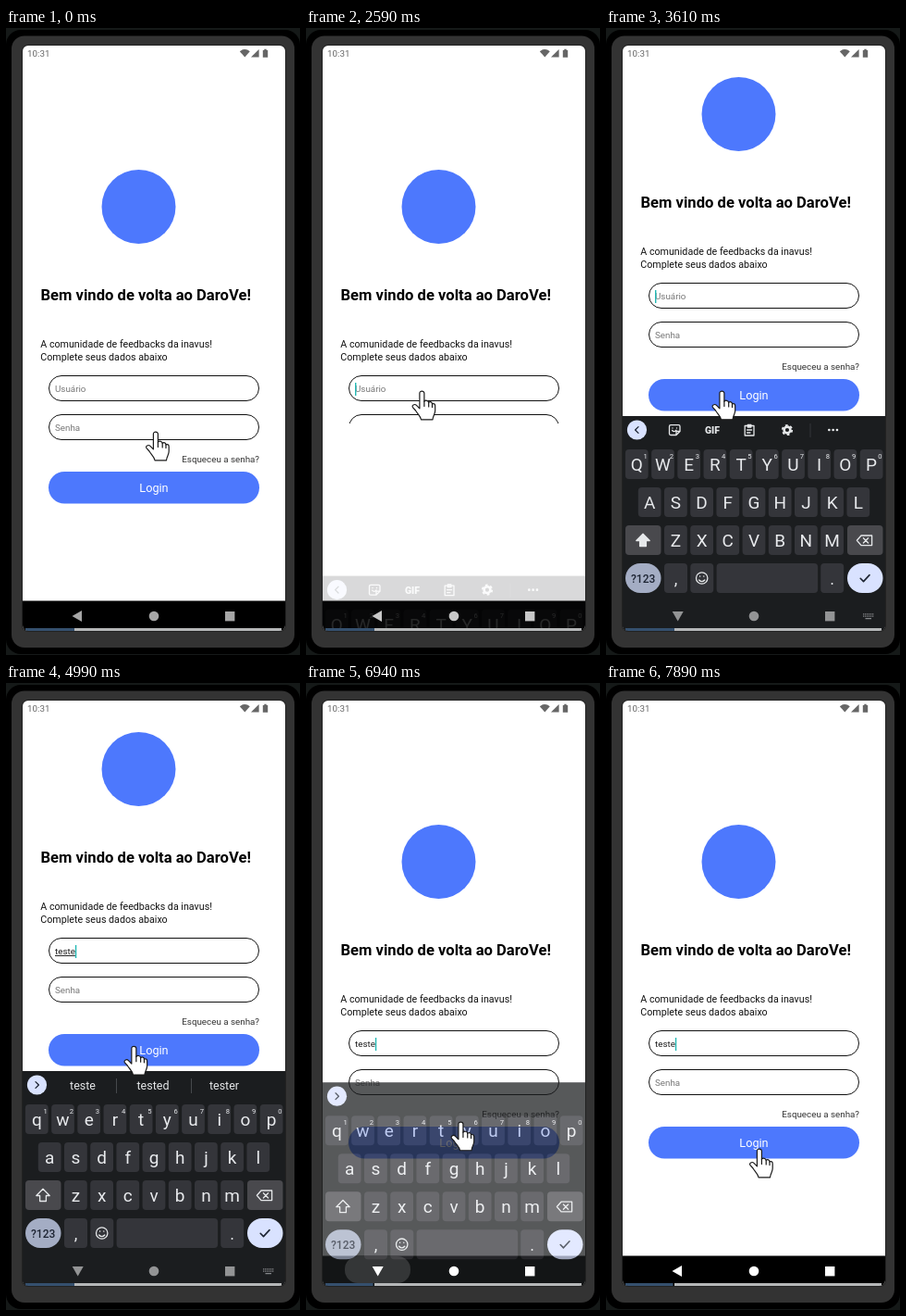
An HTML page for the animation above (8000 ms loop, 318 by 677 pixels).

```html
<!DOCTYPE html>
<html lang="pt">
<head>
<meta charset="utf-8">
<title>Login</title>
<style>
html, body { margin: 0; width: 100%; height: 100%; overflow: hidden; background: #151918; }
svg { display: block; width: 318px; height: 677px; font-family: Roboto, "Open Sans", sans-serif; }
text { white-space: pre; }
.mid { text-anchor: middle; }
.line { fill: none; stroke: #e6e8ea; stroke-width: 1.3; stroke-linecap: round; stroke-linejoin: round; }
.ink { stroke: #1d2433; }
</style>
</head>
<body>
<svg viewBox="0 0 318 677">
  <defs>
    <clipPath id="screen"><rect x="18" y="19" width="284" height="632" rx="6"/></clipPath>
  </defs>
  <rect y="2" width="318" height="674" rx="16"/>
  <rect x="6" y="8.5" width="306" height="660.5" rx="14" fill="#333"/>
  <rect x="17" y="18" width="286" height="634" rx="7" fill="#222"/>
  <g clip-path="url(#screen)">
    <rect x="17" y="18" width="286" height="634" fill="#fff"/>

    <g id="page">
      <circle cx="143.5" cy="193" r="40" fill="#4d78fd"/>
      <text x="37.5" y="294" font-size="16.6" font-weight="700">Bem vindo de volta ao DaroVe!</text>
      <g font-size="10.7" fill="#111">
        <text x="37.3" y="345">A comunidade de feedbacks da inavus!</text>
        <text x="37.3" y="359">Complete seus dados abaixo</text>
      </g>
      <g fill="none" stroke="#111">
        <rect x="46.5" y="375.5" width="227" height="27" rx="13.5"/>
        <rect x="46.5" y="417.5" width="227" height="27" rx="13.5"/>
      </g>
      <g font-size="9.8">
        <text id="user" x="53" y="393"></text>
        <text x="53" y="435" fill="#777">Senha</text>
        <text x="274" y="469" text-anchor="end" fill="#333">Esqueceu a senha?</text>
      </g>
      <rect id="caret" y="383" width="1.4" height="14" fill="#22b8b4"/>
      <rect x="46" y="479" width="228" height="34.5" rx="17.2" fill="#4d78fd"/>
      <text class="mid" x="160" y="501" font-size="12.7" fill="#fff">Login</text>
      <rect id="blank" x="17" y="427" width="286" height="192" fill="#fff"/>
    </g>

    <g fill="#666">
      <text x="23" y="31.3" font-size="9.8">10:31</text>
      <path d="M252.8 25.2Q258.3 20.8 263.8 25.2L258.3 31.6Z"/>
      <path d="M265 31.6L273.6 23V31.6Z"/>
      <path d="M277.8 24H279.3V22.8H281.7V24H283.2V31.8H277.8Z"/>
    </g>

    <rect x="17" y="618.5" width="286" height="34"/>

    <g id="keyboard">
      <rect x="17" y="419" width="286" height="234" fill="#1b1d1f"/>
      <circle cx="33.5" cy="434" r="10.6" fill="#d9e2ff"/>
      <path id="chevron" class="line ink" d="M35 430.6L31.6 434L35 437.4"/>
      <g id="tools">
        <path class="line" d="M70 428.7H78.5Q80 428.7 80 430.2V435.5L76 439.5H70Q68.5 439.5 68.5 438V430.2Q68.5 428.7 70 428.7ZM80 435.5H76V439.5M71.6 434.5Q73.8 437 76 434.2M72 431.8V432M76.5 431.8V432"/>
        <text class="mid" x="115" y="438" font-size="10.5" font-weight="900" fill="#e6e8ea">GIF</text>
        <path class="line" d="M150.2 429.5H160V440H150.2ZM153.3 428.3H156.9V431H153.3ZM152.6 434H157.6M152.6 437H156"/>
        <g fill="none" stroke="#e6e8ea">
          <circle cx="196" cy="434" r="3.4" stroke-width="2.6"/>
          <circle cx="196" cy="434" r="5.2" stroke-width="1.8" stroke-dasharray="2.7 2.745"/>
        </g>
        <path d="M221 427V442" stroke="#34373a"/>
        <path class="line" style="stroke-width:2.6" d="M241.3 434H241.4M245.6 434H245.7M249.9 434H250"/>
      </g>
      <g id="words" class="mid" font-size="12.5" fill="#e6e8ea">
        <path d="M119.5 427V443M200.5 427V443" stroke="#46494c"/>
        <text x="83" y="439"></text><text x="159" y="439"></text><text x="236" y="439"></text>
      </g>
      <g id="keys" class="mid" fill="#e8eaed"></g>
      <path id="shift" class="line" d="M40 546.3L47.2 553.5H43.4V559.5H36.6V553.5H32.8Z"/>
      <path class="line" d="M276 548H287.6V558.6H276L271.4 553.3ZM278.4 550.8L283.6 556M283.6 550.8L278.4 556"/>
      <g class="line">
        <circle cx="103.7" cy="594" r="6.2"/>
        <path d="M100.6 596Q103.7 599.4 106.8 596M101.6 592V592.2M105.8 592V592.2"/>
      </g>
      <path class="line ink" style="stroke-width:1.6" d="M275.2 594.3L278.5 597.6L285 590.6"/>
    </g>

    <rect id="ripple" x="42" y="619" width="71" height="29" rx="14" fill="#fff"/>
    <g id="nav">
      <path id="back" d="M71.5 635L82 629V641Z"/>
      <circle cx="160" cy="635" r="5.3"/>
      <rect x="237" y="630" width="10.4" height="10.4"/>
      <g id="imeIcon" fill="none" stroke="#85878a" stroke-width="1.2">
        <path d="M278 632.8H289.5M278 635.2H289.5" stroke-dasharray="1.3 .7"/>
        <path d="M280.5 637.6H287"/>
      </g>
    </g>

    <rect x="74" y="648" width="224" height="3" fill="#b5b7b8"/>
    <rect id="played" x="21" y="648" height="3" fill="#35506e"/>
  </g>

  <g id="hand" stroke="#1a1a1a" stroke-width="1.2" stroke-linejoin="round" stroke-linecap="round">
    <path fill="#fff" d="M-2.6 2.2C-2.6-.6 2.4-.6 2.4 2.2V11.2C3.6 9.6 7 10 7.2 12.4C8.6 11.2 11 11.6 11 13.9C12.6 13 14.2 14 14.2 16V21C14.2 25 12 26 11.5 30.8H-1C-1.4 27-5 24.5-7 21L-10 17.6C-11.6 15.4-8 13.4-6 15.4L-2.6 18.8Z"/>
    <path fill="none" d="M2.4 11.2V16.5M7.2 12.6V17M11 14V17.6"/>
  </g>
</svg>
<script>
const LOOP = 8000;
const SVG = "http://www.w3.org/2000/svg";
const $ = id => document.getElementById(id);

function add(parent, tag, attrs, text = "") {
  const el = document.createElementNS(SVG, tag);
  for (const name in attrs) el.setAttribute(name, attrs[name]);
  el.textContent = text;
  return parent.appendChild(el);
}

// Keyboard layout
const letters = [];
function key(x, y, w, fill = "#34353a", r = 4) {
  add($("keys"), "rect", { x, y, width: w, height: 32, rx: r, fill });
}
function row(chars, firstX, y, digits) {
  [...chars].forEach((char, i) => {
    const x = firstX + i * 28.2;
    key(x - 12.4, y, 24.8);
    letters.push([add($("keys"), "text", { x, y: y + 23, "font-size": 19 }), char]);
    if (digits) add($("keys"), "text", { x: x + 9.3, y: y + 9.5, "font-size": 7.6 }, (i + 1) % 10);
  });
}
row("qwertyuiop", 33.3, 455, true);
row("asdfghjkl", 47.2, 496);
row("zxcvbnm", 75.4, 537);
key(21, 537, 38.5, "#49494d");
key(261, 537, 38.5, "#49494d");
key(21, 578, 38.5, "#a4adc4", 16);
key(63, 578, 25);
key(91.3, 578, 25);
key(119.6, 578, 109.5);
key(232.2, 578, 25);
key(261, 578, 38.5, "#d9e2ff", 16);
add($("keys"), "text", { x: 40.2, y: 598.5, "font-size": 12, "font-weight": 500, fill: "#1d2433" }, "?123");
add($("keys"), "text", { x: 75.5, y: 601, "font-size": 18 }, ",");
add($("keys"), "text", { x: 244.7, y: 601, "font-size": 18 }, ".");

// Timed tracks: [time, ...values], linear between points
const handPath = [
  [100, 162, 436], [380, 140, 409], [660, 125.5, 392], [4430, 125.5, 392], [4810, 138.5, 392],
  [4990, 138.5, 392], [5200, 128, 440], [5500, 100, 560], [5770, 78, 628], [5850, 75, 634],
  [6740, 75, 634], [6860, 130, 540], [6940, 167.5, 474], [7060, 171, 466], [7420, 166, 503]
];
const slide = [
  [2550, 232, 0], [2590, 174, .16], [2670, 64, .6], [2750, 15, 1], [2850, 0, 1],
  [6880, 0, 1], [6940, 11.3, .74], [7020, 85, .25], [7100, 190, 0]
];
const rippleFade = [[6700, 0], [6780, .2], [6900, .18], [7100, 0]];

const typed = [
  [3690, "t", "the", "to"],
  [3950, "te", "tell", "test"],
  [4190, "tes", "test", "yes"],
  [4510, "test", "tests", "testing"],
  [4810, "teste", "tested", "tester"]
];
const FOCUS = 2450, PAN_IN = 2650, DISMISS = 6860;

function at(track, t) {
  const next = track.findIndex(p => p[0] > t);
  if (next === 0) return track[0].slice(1);
  if (next < 0) return track[track.length - 1].slice(1);
  const a = track[next - 1], b = track[next], k = (t - a[0]) / (b[0] - a[0]);
  return a.slice(1).map((v, i) => v + (b[i + 1] - v) * k);
}

const show = (id, on) => { $(id).style.display = on ? "" : "none"; };
const during = (t, from, to) => t >= from && t < to;

function render(t) {
  const step = typed.filter(s => s[0] <= t).pop();
  const open = during(t, PAN_IN, DISMISS);
  const [offset, alpha] = at(slide, t);

  $("page").setAttribute("transform", `translate(0 ${open ? -100 : 0})`);
  show("blank", during(t, 2550, PAN_IN));

  const user = $("user");
  user.textContent = step ? step[1] : "Usuário";
  user.setAttribute("fill", step ? "#222" : "#777");
  user.setAttribute("text-decoration", step && t < DISMISS ? "underline" : "none");
  $("caret").setAttribute("x", step ? 53 + user.getComputedTextLength() : 53);
  const blinkStart = step ? step[0] + 20 : FOCUS;
  show("caret", t >= FOCUS && (t < blinkStart || Math.floor((t - blinkStart) / 500) % 2 === 0));

  $("keyboard").setAttribute("transform", `translate(0 ${offset})`);
  $("keyboard").setAttribute("opacity", alpha);
  show("tools", !step);
  show("words", step && t < DISMISS);
  if (step) $("words").querySelectorAll("text").forEach((el, i) => { el.textContent = step[i + 1]; });
  $("chevron").setAttribute("transform", step ? "rotate(180 33.5 434)" : "");
  $("shift").style.fill = step ? "none" : "#e6e8ea";
  for (const [el, char] of letters) el.textContent = step ? char : char.toUpperCase();

  $("nav").setAttribute("fill", t < 2550 ? "#a6a6a6" : t < 2700 ? "#c8c8c8" : t < DISMISS ? "#939495" : "#fff");
  $("back").setAttribute("transform", during(t, 2750, 7140) ? "rotate(-90 77.3 634.6)" : "");
  show("imeIcon", during(t, 2750, DISMISS));
  $("ripple").setAttribute("opacity", at(rippleFade, t)[0]);
  $("played").setAttribute("width", t < DISMISS ? 53 : 51.5);
  $("hand").setAttribute("transform", `translate(${at(handPath, t)})`);
}

const start = performance.now();
function tick() {
  render((performance.now() - start) % LOOP);
  requestAnimationFrame(tick);
}
tick();
</script>
</body>
</html>
```
